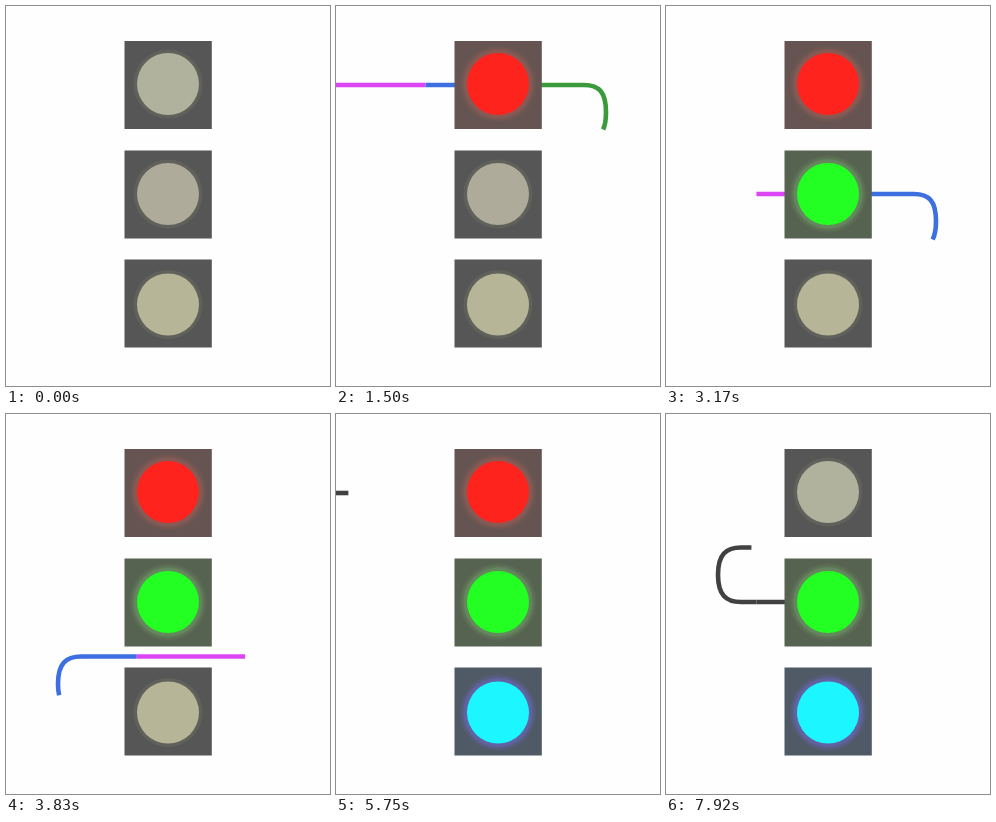
Animation, 324 px wide and 380 px high, one loop 8 s. Source, as an HTML page:

```html
<!DOCTYPE html>
<html lang="en">
<head>
<meta charset="utf-8">
<title>Three lamps</title>
<style>
  html, body { margin: 0; width: 100%; height: 100%; overflow: hidden; background: #fefefe; }
  svg { display: block; width: 324px; height: 380px; }
</style>
</head>
<body>
<svg id="stage" viewBox="0 0 324 380"></svg>
<script>
const LOOP = 8000, FPS = 12;
const STEP = 30.83;          // path units per tick
const PART = 108;            // length of one strip part
const ROW = 507;             // path units from one lamp to the next
const END = 1354;
const COLORS = ['#e5362f', '#3b9a3b', '#3d6fe0', '#db45f3'];
const DARK = '#414141';
const RUNS = [{ start: 4.6, parts: 4 }, { start: 68.6, parts: 3, dark: true }];
const LAMPS = [
  { y: 35, cy: 78, off: '#b1b29e', on: '#ff231d', rim: '#8a5b54', box: '#655451' },
  { y: 144.5, cy: 188, off: '#aeab9a', on: '#23ff23', rim: '#668a5e', box: '#576351' },
  { y: 253.5, cy: 298.5, off: '#b6b598', on: '#1cf6ff', rim: '#6264a6', box: '#505966' }
];

const stage = document.getElementById('stage');
function add(tag, attrs, parent = stage) {
  const el = document.createElementNS('http://www.w3.org/2000/svg', tag);
  for (const k in attrs) el.setAttribute(k, attrs[k]);
  return parent.appendChild(el);
}

// Serpentine track: right turn down, then left turn down, twice
const turn = (x, far, y) => {
  const s = Math.sign(far - x);
  return `H${x}C${x + 15 * s},${y} ${far},${y + 7} ${far},${y + 27.25}` +
         `S${x + 15 * s},${y + 54.5} ${x},${y + 54.5}`;
};
const track = 'M0,79' + turn(248, 270, 79) + turn(75, 52, 133.5) +
              turn(248, 270, 188) + turn(75, 52, 242.5) + 'H340';

const strips = COLORS.map(() => add('path', {
  d: track, fill: 'none', 'stroke-width': 4.6, pathLength: END
}));

const defs = add('defs', {});
const lamps = LAMPS.map((l, i) => {
  const glow = add('radialGradient', {
    id: 'glow' + i, gradientUnits: 'userSpaceOnUse', cx: 162, cy: l.cy, r: 50
  }, defs);
  add('stop', { offset: 0.62, 'stop-color': l.rim }, glow);
  add('stop', { offset: 0.78, 'stop-color': l.box }, glow);
  add('stop', { offset: 1, 'stop-color': l.box }, glow);
  return {
    box: add('rect', { x: 118.5, y: l.y, width: 87.3, height: 88 }),
    rim: add('circle', { cx: 162, cy: l.cy, r: 34.5 }),
    bulb: add('circle', { cx: 162, cy: l.cy, r: 31 })
  };
});

function paintLamp(i, lit) {
  const { box, rim, bulb } = lamps[i], l = LAMPS[i];
  box.setAttribute('fill', lit ? `url(#glow${i})` : '#565656');
  rim.setAttribute('fill', lit ? l.rim : '#61615b');
  rim.setAttribute('fill-opacity', lit ? 0.7 : 1);
  bulb.setAttribute('fill', lit ? l.on : l.off);
}

// A part has been swallowed once its tail reaches the lamp's box
const swallowed = (i, head) => head - PART * (i + 1) >= ROW * i + 105;

function draw(time) {
  const tick = Math.floor((time + 4) * FPS / 1000);
  const [first, second] = RUNS.map(r => (tick - r.start) * STEP);
  const run = second > 0 ? RUNS[1] : RUNS[0];
  const head = second > 0 ? second : first;

  strips.forEach((strip, i) => {
    const limit = i < LAMPS.length ? ROW * i + 162 : END;
    const from = Math.max(0, head - PART * (i + 1));
    const to = Math.min(limit, head - PART * i);
    const shown = i < run.parts && to > from;
    strip.setAttribute('visibility', shown ? 'visible' : 'hidden');
    if (!shown) return;
    strip.setAttribute('stroke', run.dark ? DARK : COLORS[i]);
    strip.setAttribute('stroke-dasharray', `0 ${from} ${to - from} ${2 * END}`);
  });

  LAMPS.forEach((_, i) => paintLamp(i, swallowed(i, first) && !swallowed(i, second)));
}

const begin = performance.now();
function frame() {
  draw((performance.now() - begin) % LOOP);
  requestAnimationFrame(frame);
}
draw(0);
requestAnimationFrame(frame);
</script>
</body>
</html>
```
